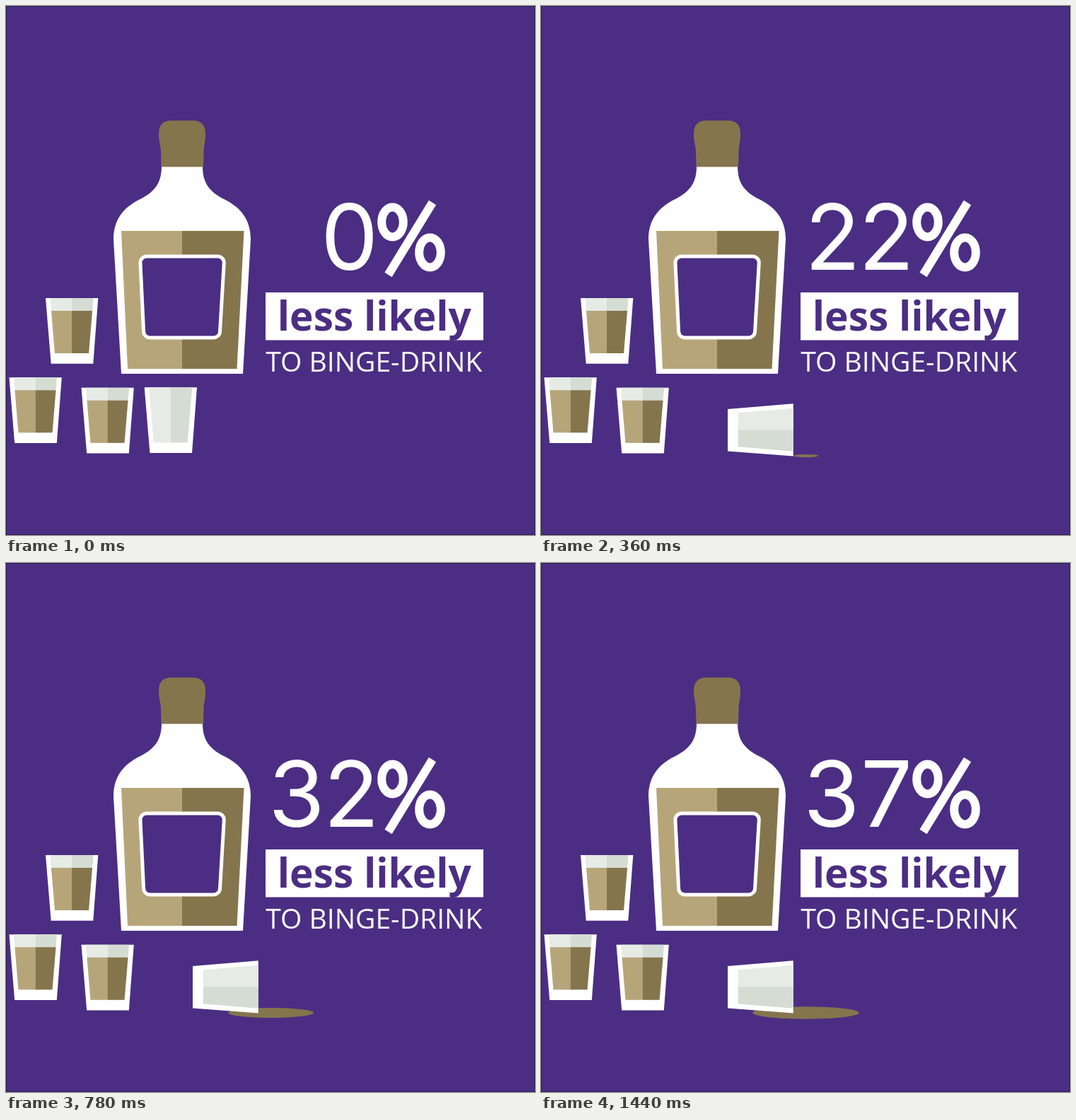
An HTML page with a canvas for the animation above (3.44 s loop, 748 by 748 pixels).

```html
<!DOCTYPE html>
<html lang="en">
<head>
<meta charset="utf-8">
<title>Less likely to binge-drink</title>
<style>
  html, body { margin: 0; height: 100%; overflow: hidden; background: #4b2e83; }
  canvas { display: block; width: 748px; height: 748px; }
</style>
</head>
<body>
<canvas id="stage" width="748" height="748"></canvas>
<script>
const ctx = document.getElementById('stage').getContext('2d');

const PURPLE = '#4b2e83', WHITE = '#fff';
const GOLD = '#b7a57a', BROWN = '#85754d';
const GLASS = '#e6ebe6', SHADE = '#d5dcd3';
const LOOP = 3440, STEP = 30;

// [time in ms, count]
const COUNT = [[0, 0], [210, 14], [360, 22], [570, 28], [780, 32],
               [930, 34], [1050, 35], [1200, 36], [1440, 37]];

const clamp = (v, lo, hi) => Math.min(hi, Math.max(lo, v));
const mix = (a, b, p) => a + (b - a) * p;

function countAt(t) {
  for (let i = 1; i < COUNT.length; i++) {
    const [t0, v0] = COUNT[i - 1], [t1, v1] = COUNT[i];
    if (t < t1) return Math.floor(mix(v0, v1, (t - t0) / (t1 - t0)));
  }
  return COUNT[COUNT.length - 1][1];
}

function poly(color, ...pts) {
  ctx.fillStyle = color;
  ctx.beginPath();
  for (let i = 0; i < pts.length; i += 2) ctx.lineTo(pts[i], pts[i + 1]);
  ctx.fill();
}

function fillPath(color, d) {
  ctx.fillStyle = color;
  ctx.fill(new Path2D(d));
}

function ellipse(x, y, rx, ry) {
  ctx.beginPath();
  ctx.ellipse(x, y, rx, ry, 0, 0, Math.PI * 2);
}

function drawLabel() {
  const pts = [[189.5, 354], [308.8, 354], [302, 469], [195, 469]];
  ctx.beginPath();
  ctx.moveTo(249, 354);
  for (let i = 1; i <= 4; i++) {
    ctx.arcTo(...pts[i % 4], ...pts[(i + 1) % 4], 9);
  }
  ctx.closePath();
  ctx.fillStyle = PURPLE;
  ctx.fill();
  ctx.strokeStyle = WHITE;
  ctx.lineWidth = 5;
  ctx.stroke();
}

function drawBottle() {
  fillPath(WHITE, 'M220 226C220 250 211 262 190 273C165 285 152 303 152 330' +
    'L163 520H335L346 330C346 303 333 285 308 273C287 262 278 250 278 226Z');
  fillPath(BROWN, 'M219.5 227.5L219 207C219 197 216 193 216 181C216 168 222 162 234 162' +
    'H264C276 162 282 168 282 181C282 193 279.5 197 279.5 207L279 227.5Z');
  poly(GOLD, 163, 318, 249, 318, 249, 513, 172, 513);
  poly(BROWN, 249, 318, 336.5, 318, 326.5, 513, 249, 513);
  drawLabel();
}

// Left and right halves of the tapered inside, from height y down to the base
function inside(y, left, right) {
  const inset = 6.5 * y / 78;
  poly(left, 6.5 + inset, y, 37, y, 37, 78, 13, 78);
  poly(right, 37, y, 67.5 - inset, y, 61, 78, 37, 78);
}

function drawGlass(x, y, full) {
  ctx.save();
  ctx.translate(x, y);
  poly(WHITE, 0, 0, 74.3, 0, 67.3, 92.7, 7.7, 92.7);
  inside(0, GLASS, SHADE);
  if (full) inside(18, GOLD, BROWN);
  ctx.restore();
}

// The empty glass tips over its lower right corner
function drawFallingGlass(t) {
  const p = clamp((t - 30) / 330, 0, 1);
  ctx.save();
  ctx.translate(mix(263, 264, p), mix(632, 629.5, p));
  ctx.rotate(p * Math.PI / 2);
  drawGlass(-67.3, -92.7, false);
  ctx.restore();
}

function drawPuddle(t) {
  const rx = clamp((t - 189) * 0.102, 0, 75.3);
  ctx.fillStyle = BROWN;
  ellipse(374.5, 636, rx, rx * 0.116);
  ctx.fill();
}

function drawPercent() {
  ctx.strokeStyle = WHITE;
  ctx.lineWidth = 12;
  for (const [x, y] of [[546.5, 305.5], [599.5, 348.5]]) {
    ellipse(x, y, 15.3, 21);
    ctx.stroke();
  }
  ctx.beginPath();
  ctx.moveTo(603, 278);
  ctx.lineTo(540.5, 380);
  ctx.stroke();
}

// Digits are set from the right with an even gap between their edges
function drawCount(n) {
  ctx.font = '400 129px Inter, sans-serif';
  ctx.fillStyle = WHITE;
  ctx.textAlign = 'left';
  let right = 519;
  for (const digit of String(n).split('').reverse()) {
    const m = ctx.measureText(digit);
    ctx.fillText(digit, right - m.actualBoundingBoxRight, 373);
    right -= m.actualBoundingBoxRight + m.actualBoundingBoxLeft + 15;
  }
}

function drawCaption() {
  ctx.fillStyle = WHITE;
  ctx.fillRect(367, 405, 308, 67.5);
  ctx.textAlign = 'center';
  ctx.font = '700 56.8px "Open Sans", sans-serif';
  ctx.fillStyle = PURPLE;
  ctx.fillText('less likely', 520.8, 459);
  ctx.font = '400 39px "Open Sans", sans-serif';
  ctx.fillStyle = WHITE;
  ctx.fillText('TO BINGE-DRINK', 520.3, 517);
}

function draw(t) {
  ctx.fillStyle = PURPLE;
  ctx.fillRect(0, 0, 748, 748);
  ctx.strokeStyle = '#2c1b4e';
  ctx.lineWidth = 1;
  ctx.strokeRect(0.5, 0.5, 747, 747);

  drawBottle();
  drawGlass(56, 413, true);
  drawGlass(4.5, 525.3, true);
  drawGlass(106.5, 539.8, true);
  drawPuddle(t);
  drawFallingGlass(t);
  drawCount(countAt(t));
  drawPercent();
  drawCaption();
}

const start = performance.now();
function tick() {
  const t = (performance.now() - start) % LOOP;
  draw(Math.floor(t / STEP) * STEP);
  requestAnimationFrame(tick);
}
tick();
</script>
</body>
</html>
```
